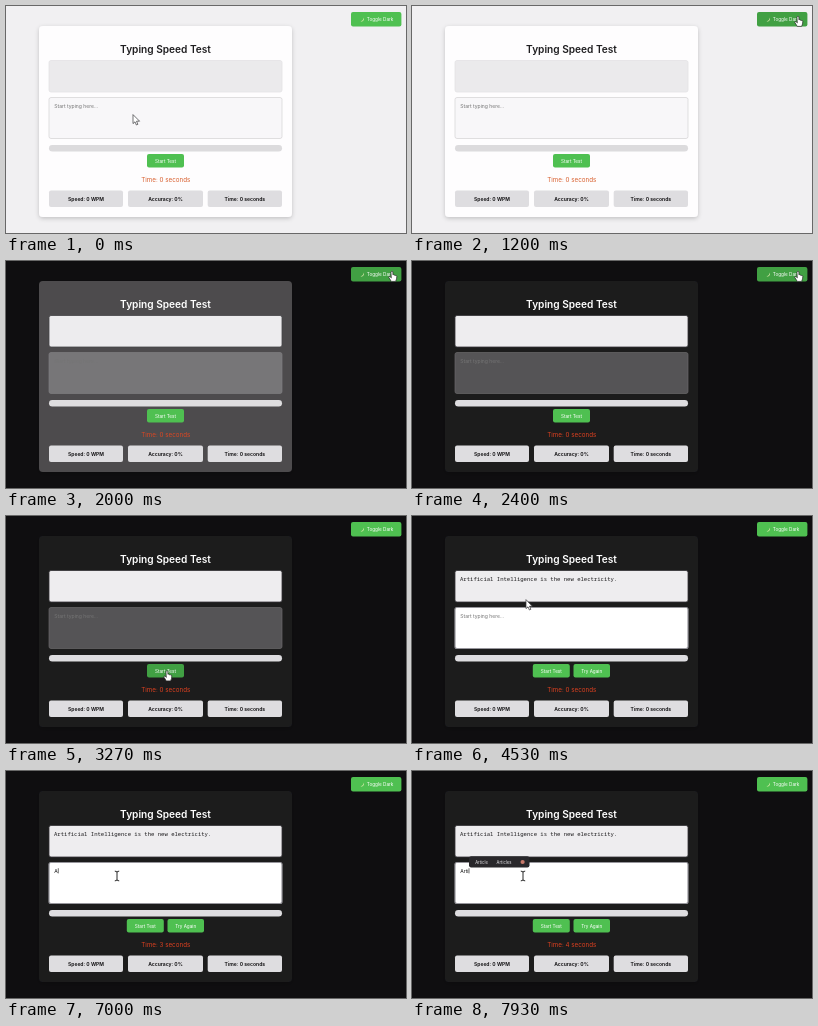
An HTML page that plays this animation: 400x227 px, repeating every 8 s.

```html
<!DOCTYPE html>
<html lang="en">
<head>
<meta charset="utf-8">
<title>Typing Speed Test</title>
<style>
  html, body { margin: 0; width: 100%; height: 100%; overflow: hidden; }
  svg { display: block; width: 100vw; height: 100vh; }
  text { font-family: Inter, sans-serif; white-space: pre; }
  .mid { text-anchor: middle; }
  .btn { font-size: 4.65px; fill: #fff; }
  .stat { font-size: 5px; font-weight: 700; fill: #1c1b1d; }
  .input { font-size: 5.03px; }
  .mono { font: 5.58px "Noto Sans Mono", monospace; fill: #1c1b1d; }
  .tip { font-size: 4.15px; fill: #e6e5e8; }
</style>
</head>
<body>
<svg viewBox="0 0 400 227" preserveAspectRatio="none">
  <defs>
    <filter id="shadow" x="-10%" y="-10%" width="120%" height="120%">
      <feDropShadow dx="0" dy="1.5" stdDeviation="2" flood-opacity=".2"/>
    </filter>
  </defs>
  <rect id="page" width="400" height="227"/>
  <rect id="card" x="33" y="20" width="253" height="191" rx="4" filter="url(#shadow)"/>
  <text id="title" class="mid" x="159.5" y="46.8" font-size="10.15" font-weight="600">Typing Speed Test</text>

  <rect id="quote" x="43" y="54.5" width="233" height="31.5" rx="2" stroke-width=".8"/>
  <text id="phrase" class="mono" x="48" y="65.4">Artificial Intelligence is the new electricity.</text>

  <rect id="area" x="43" y="91.5" width="233" height="41" rx="2"/>
  <text id="entry" class="input" x="48.3" y="101.6"></text>
  <rect id="caret" y="97.2" width=".6" height="5.2" fill="#111"/>

  <rect id="bar" x="43" y="139" width="233" height="6.5" rx="3.25"/>

  <g id="start">
    <rect id="startBox" x="141" y="148" width="37" height="13.6" rx="2"/>
    <text class="btn mid" x="159.5" y="156.5">Start Test</text>
  </g>
  <g id="again">
    <rect x="161.5" y="148" width="36.5" height="13.6" rx="2" fill="#4fc051"/>
    <text class="btn mid" x="179.7" y="156.5">Try Again</text>
  </g>
  <rect id="toggle" x="345" y="6" width="50.4" height="14.6" rx="2"/>
  <path d="M357.2 11.6a2 2 0 1 1-3 3.1a2.3 2.3 0 0 0 3-3.1z" fill="#e9efb4"/>
  <text class="btn" x="360.8" y="15.2">Toggle Dark</text>

  <text id="timer" class="mid" x="159.8" y="175.6" font-size="6.25"></text>
  <g id="stats"></g>

  <g id="tip">
    <rect x="57" y="85.2" width="60.5" height="11.2" rx="2.2" fill="#29282b"/>
    <text class="tip" x="63.2" y="92.6">Article</text>
    <text class="tip" x="84.6" y="92.6">Articles</text>
    <circle cx="110.6" cy="91" r="2.1" fill="#c8796a"/>
  </g>

  <g id="pointer" stroke-linejoin="round" stroke-linecap="round">
    <path id="arrow" d="M0 0V8.6L2 6.8L3.4 10L4.9 9.3L3.5 6.2H6.2Z" fill="#fff" stroke="#39383b" stroke-width=".7"/>
    <path id="hand" d="M-.9 .8Q0 -.6 .9 .8V3.8Q1.8 3.2 2.3 4.2Q3.2 3.6 3.6 4.6Q4.6 4.2 4.8 5.4Q4.9 8 3.6 10.4H-.8Q-1.8 8.4 -3.2 6.6Q-3.4 5.2 -2 5.6L-.9 6.6Z" fill="#fff" stroke="#222" stroke-width=".7"/>
    <path id="beam" d="M-1.8 -4.8Q0 -4.8 0 -3.8Q0 -4.8 1.8 -4.8M0 -3.8V3.8M-1.8 4.8Q0 4.8 0 3.8Q0 4.8 1.8 4.8" fill="none" stroke="#111" stroke-width=".9"/>
  </g>
</svg>
<script>
const LOOP = 8000, DARK = 1855, CLICK = 3850, FADE = 300;
const $ = id => document.getElementById(id);
const set = (id, attrs) => {
  for (const k in attrs) $(id).setAttribute(k, attrs[k]);
};
const show = (id, on) => set(id, { visibility: on ? 'visible' : 'hidden' });
const clamp = v => Math.min(1, Math.max(0, v));

const toggleHover = [930, 2570], startHover = [3000, CLICK];
const keys = [[6880, 'A'], [7280, 'Ar'], [7640, 'Art'], [7860, 'Arti']];
const path = [
  [100, 127, 109], [980, 386, 10], [2450, 386, 10], [3120, 161, 154.5],
  [3900, 161, 154.5], [4350, 114, 84], [4680, 114, 84], [5050, 111, 105]
];

[[43, 74, 'Speed: 0 WPM'], [122, 75, 'Accuracy: 0%'], [201.7, 74.3, 'Time: 0 seconds']].forEach(([x, w, label]) => {
  $('stats').innerHTML += `<rect x="${x}" y="184.6" width="${w}" height="16.4" rx="2" fill="#dedde0"/>
    <text class="stat mid" x="${x + w / 2}" y="194.6">${label}</text>`;
});

// CSS "ease": cubic-bezier(.25, .1, .25, 1)
function ease(x) {
  if (x <= 0 || x >= 1) return clamp(x);
  const bez = (a, b, u) => 3 * a * u * (1 - u) ** 2 + 3 * b * u * u * (1 - u) + u ** 3;
  let lo = 0, hi = 1;
  for (let i = 0; i < 20; i++) {
    const u = (lo + hi) / 2;
    if (bez(.25, .25, u) < x) lo = u; else hi = u;
  }
  return bez(.1, 1, lo);
}

function mix(a, b, p) {
  const part = (c, i) => parseInt(c.slice(i, i + 2), 16);
  return `rgb(${[1, 3, 5].map(i => Math.round(part(a, i) + (part(b, i) - part(a, i)) * p))})`;
}

const within = (t, [from, to]) => t >= from && t < to;
const green = (t, [from, to]) =>
  mix('#4fc051', '#41a043', ease((t - from) / FADE) - ease((t - to) / FADE));

function pointerAt(t) {
  const i = path.findIndex(k => k[0] > t);
  if (i < 0) return path[path.length - 1].slice(1);
  if (i === 0) return path[0].slice(1);
  const [t0, x0, y0] = path[i - 1], [t1, x1, y1] = path[i];
  const u = (t - t0) / (t1 - t0), p = u * u * (3 - 2 * u);
  return [x0 + (x1 - x0) * p, y0 + (y1 - y0) * p];
}

function drawPointer(t) {
  const [x, y] = pointerAt(t);
  const hand = within(t, toggleHover) || within(t, startHover);
  const beam = t >= CLICK && x > 43 && x < 276 && y > 91.5 && y < 132.5;
  set('pointer', { transform: `translate(${x} ${y})` });
  show('hand', hand);
  show('beam', beam);
  show('arrow', !hand && !beam);
}

function drawEntry(t, running) {
  const key = keys.filter(k => k[0] <= t).pop();
  $('entry').textContent = key ? key[1] : 'Start typing here...';
  set('entry', { fill: key ? '#111' : '#757575' });
  const since = t - (key ? key[0] : CLICK);
  show('caret', running && since % 1000 < 500);
  set('caret', { x: key ? 48.4 + $('entry').getComputedTextLength() : 48.2 });
  show('tip', t >= 7640);
}

function draw(t) {
  const dark = t >= DARK, running = t >= CLICK, p = ease((t - DARK) / FADE);
  set('page', { fill: dark ? '#0f0e10' : '#f1f0f2' });
  set('card', { fill: mix('#fefdfe', '#1d1c1e', p) });
  set('title', { fill: dark ? '#ffffff' : '#1f1e20' });
  set('quote', {
    fill: mix('#ebeaec', '#eeedef', p),
    stroke: dark ? mix('#88878a', '#333235', p) : '#e4e3e5'
  });
  show('phrase', running);
  set('area', running
    ? { fill: '#ffffff', stroke: '#97969c', 'stroke-width': 1.2 }
    : { fill: mix('#f8f7f9', '#555456', p), stroke: mix('#d4d3d5', '#6a696b', p), 'stroke-width': .7 });
  set('bar', { fill: mix('#dcdbdd', '#dedde0', p) });
  set('start', { transform: `translate(${running ? -20.2 : 0} 0)` });
  set('startBox', { fill: green(t, startHover) });
  set('toggle', { fill: green(t, toggleHover) });
  show('again', running);
  const secs = running ? Math.floor((t - CLICK) / 1000) : 0;
  $('timer').textContent = `Time: ${secs} seconds`;
  set('timer', { fill: mix('#d8602f', '#dc4020', p) });
  drawEntry(t, running);
  drawPointer(t);
}

const began = performance.now();
function tick() {
  draw((performance.now() - began) % LOOP);
  requestAnimationFrame(tick);
}
tick();
</script>
</body>
</html>
```
